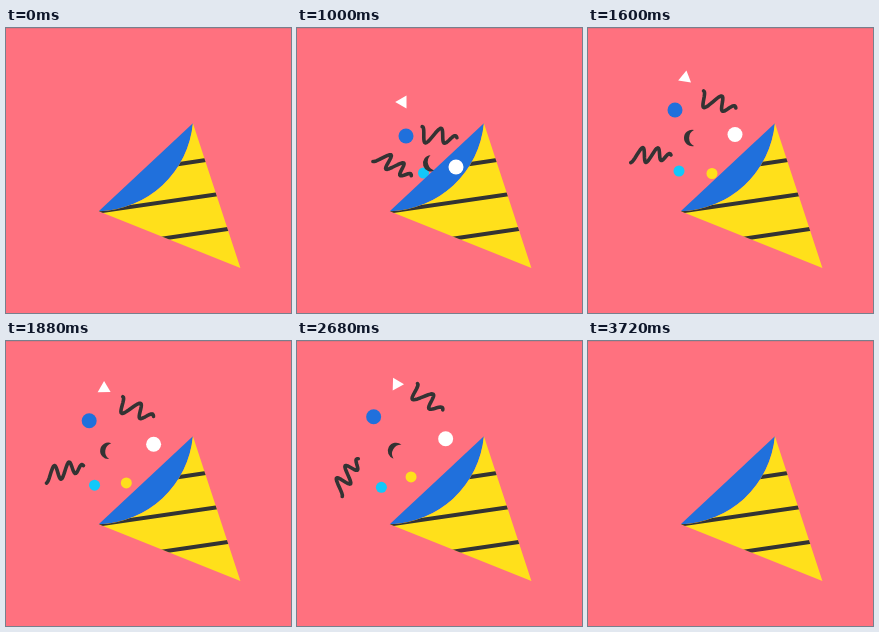
Write an HTML page that moves like this. It is 285 by 285 pixels and loops after 3840 ms.

```html
<!DOCTYPE html>
<html lang="en">
<head>
<meta charset="utf-8">
<title>Party popper</title>
<style>
  html, body { margin: 0; height: 100%; overflow: hidden; background: #ff717f; }
  svg { display: block; width: 100vw; height: 100vh; }
  .wave { fill: none; stroke: #333; stroke-width: 3.6; stroke-linecap: round; stroke-linejoin: round; }
</style>
</head>
<body>
<svg viewBox="0 0 285 285">
  <defs>
    <path id="body" d="M92.7 183.3A97 97 0 0 0 186.9 95.2L234.4 240Z"/>
    <clipPath id="bodyClip"><use href="#body"/></clipPath>
  </defs>
  <path d="M0 .5H285" stroke="#e8707c"/>
  <g id="behind"></g>
  <path class="cone" fill="#2070dc" d="M92.7 183.3L186.9 95.2A97 97 0 0 1 92.7 183.3Z"/>
  <g id="inside"></g>
  <g class="cone">
    <use href="#body" fill="#ffe01b"/>
    <path clip-path="url(#bodyClip)" stroke="#333" stroke-width="4"
      d="M160 138L210 130.4M80 185.3L220 165M140 213L232 199.4"/>
  </g>
</svg>
<script>
const LOOP = 3840, STEP = 40, LAUNCH = 780, NEAR = 1000, MID = 1600, FAR = 3200, CLEAR = 3720;
const muzzle = [172, 172];

const dot = r => `M${-r} 0a${r} ${r} 0 1 0 ${2 * r} 0a${r} ${r} 0 1 0 ${-2 * r} 0`;

// A leaning cosine streamer that flattens out towards its tail.
function wave(halfWaves, height) {
  const points = [];
  for (let s = 0; s <= 1.001; s += 0.025) {
    const y = height * Math.cos(Math.PI * halfWaves * s) * (1 - s ** 6);
    points.push(`${38 * s - 19 - 0.3 * y} ${y}`);
  }
  return 'M' + points.join('L');
}

// Each path runs from the muzzle through the points for NEAR, MID and FAR.
const pieces = [
  { d: dot(5.5), fill: '#12c8fa', path: [[126.5, 145], [91, 143], [83, 147]] },
  { d: dot(5.5), fill: '#ffe01b', path: [[152, 166], [124, 145.5], [112, 134]] },
  { d: dot(7.5), fill: '#2070dc', path: [[109, 108], [87, 82], [74.5, 74.5]] },
  { d: 'M4 -8A8.2 8.2 0 1 0 4 8A9 9 0 0 1 4 -8Z', fill: '#333', angle: -17, spin: 28,
    path: [[132, 136], [102, 110], [96, 108.5]] },
  { d: 'M-7.3 0L4 -6.4V6.4Z', fill: '#fff', spin: -35, path: [[105.5, 74], [97, 50], [100, 42]] },
  { d: wave(4, -8), angle: 5, spin: 17, path: [[141, 108], [129.5, 75], [130, 55]] },
  { d: wave(5, 7.5), angle: 31, spin: -52, path: [[98, 138], [64, 127], [48, 135]] },
  { d: dot(7.5), fill: '#fff', inside: true, path: [[159, 139], [147, 106.5], [149, 96]] }
];

for (const p of pieces) {
  p.node = document.createElementNS('http://www.w3.org/2000/svg', 'path');
  p.node.setAttribute('d', p.d);
  if (p.fill) p.node.setAttribute('fill', p.fill);
  else p.node.setAttribute('class', 'wave');
  document.getElementById(p.inside ? 'inside' : 'behind').append(p.node);
  p.path.unshift(muzzle);
}
const cones = document.querySelectorAll('.cone');

// Exponential slowing that reaches 1 at the end and drifts on beyond it.
function slow(t, start, end, drag) {
  const decay = ms => 1 - Math.exp(-drag * ms / 1000);
  return decay(t - start) / decay(end - start);
}

function progress(t) {
  if (t < NEAR) return [0, slow(t, LAUNCH, NEAR, 3)];
  if (t < MID) return [1, slow(t, NEAR, MID, 5)];
  return [2, slow(t, MID, FAR, 1)];
}

function drawPieces(t) {
  const visible = t >= LAUNCH && t < CLEAR;
  const [leg, u] = progress(t);
  for (const { node, path, angle = 0, spin = 0 } of pieces) {
    node.style.display = visible ? '' : 'none';
    const [x, y] = path[leg].map((v, axis) => v + (path[leg + 1][axis] - v) * u);
    const turn = angle + spin * (t - NEAR) / 1000;
    node.setAttribute('transform', `translate(${x} ${y}) rotate(${turn})`);
  }
}

function drawCone(t) {
  const phase = Math.min(1, Math.max(0, (t - 640) / 320));
  const kick = Math.sin(Math.PI * phase) ** 2;
  for (const c of cones) c.setAttribute('transform', `translate(${9.5 * kick} ${10 * kick})`);
}

function frame() {
  const t = Math.floor(performance.now() % LOOP / STEP) * STEP;
  drawCone(t);
  drawPieces(t);
  requestAnimationFrame(frame);
}
frame();
</script>
</body>
</html>
```
